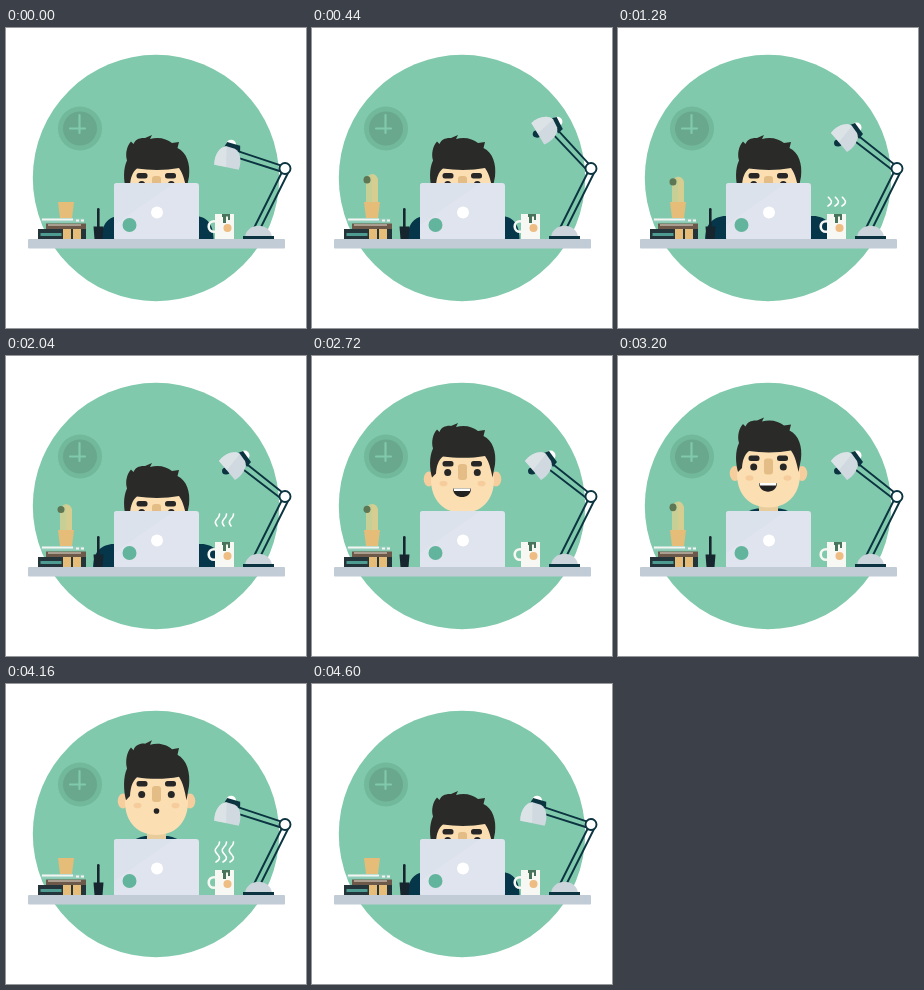
Write an HTML page that moves like this. It is 300x300 px and loops after 4.64 s.

```html
<!DOCTYPE html>
<html lang="en">
<head>
<meta charset="utf-8">
<title>Desk surprise</title>
<style>
  html, body { margin: 0; width: 100%; height: 100%; overflow: hidden; background: #fff; }
  svg { display: block; width: 100vw; height: 100vh; }
  .line { fill: none; stroke-linecap: round; stroke-linejoin: round; }
</style>
</head>
<body>
<svg viewBox="0 0 300 300">
  <clipPath id="aboveDesk"><path d="M0 0H300V212H0Z"/></clipPath>
  <circle cx="150" cy="150" r="123.2" fill="#80c9ac"/>

  <g id="clock">
    <circle cx="74" cy="100.5" r="22" fill="#72b89b"/>
    <circle cx="74" cy="100.5" r="17" fill="#69a88d"/>
    <path class="line" d="M73.5 87V105M64 100.5H79" stroke="#80c9ac" stroke-width="2.2"/>
  </g>

  <g clip-path="url(#aboveDesk)">
    <path id="arms" d="M-56 212C-56 196 -50 190 -40 188H40C50 190 56 196 56 212Z" fill="#06364a"/>
    <g id="person">
      <path d="M118 216V172Q121 156 139 152.5H162Q180 156 183 172V216Z" fill="#06364a"/>
      <path d="M141 143H160V156Q150.5 160 141 156Z" fill="#e9cc9c"/>
      <g fill="#f6cd9c">
        <ellipse cx="117" cy="117.5" rx="5.3" ry="7.5"/>
        <ellipse cx="184" cy="117.5" rx="5.3" ry="7.5"/>
      </g>
      <path d="M122 90H179L182 118C182 140 168 151.5 150.5 151.5S119 140 119 118Z" fill="#fbdfb3"/>
      <g fill="#f6cc9c">
        <ellipse cx="131.5" cy="122" rx="4" ry="2.8"/>
        <ellipse cx="169.500" cy="122" rx="4" ry="2.8"/>
      </g>
      <rect x="146" y="102.5" width="9" height="16" rx="3" fill="#e3bd85"/>
      <g fill="#272727">
        <circle cx="135.7" cy="111" r="3.5"/>
        <circle cx="165.3" cy="111" r="3.5"/>
      </g>
      <g id="smile">
        <path d="M-9 -4H9C9 7.500 -9 7.500 -9 -4Z" fill="#222"/>
        <path d="M-8.500 -4H8.500L8 -1.500H-8Z" fill="#fff"/>
      </g>
      <circle id="gasp" r="2.8" fill="#222"/>
      <path id="hair" fill="#2a2a29" d="M120 116C117.500 107 117 95 121 87C119 80 121 72 125 68L127.500 70.500
        C129 66 134 64 139 64.500L146 61.500L144 65.500C153 63 161 65.500 166 69.500L173 68.500L171.500 74.500
        C181 79 184.500 91 183 103L180.500 116C179 108 177 100 173 94.500C160 97 144 97 131 95
        C126 99 124.500 105 124 112Z"/>
      <g id="brows" fill="#272727">
        <rect x="130.500" y="99.500" width="11" height="5.500" rx="2.500"/>
        <rect x="159" y="99.500" width="11" height="5.500" rx="2.500"/>
      </g>
    </g>
  </g>

  <g id="pencils" fill="#17252e">
    <path d="M87.500 198.500H97.500L96.500 211H88.500Z"/>
    <rect x="91" y="180" width="2.600" height="20" rx="1.300"/>
  </g>

  <g id="cactus">
    <path d="M54 178V156C54 147 66 146 66 156V178Z" fill="#c8cf96"/>
    <path d="M60 149Q66 150 66 156V178H60Z" fill="#d6ce90"/>
    <circle cx="55" cy="154" r="3.500" fill="#5d7755"/>
  </g>
  <path d="M52 174H68L66 190H54Z" fill="#e5bd78"/>

  <g id="books">
    <rect x="35" y="190.500" width="43" height="4" fill="#93cdbb"/>
    <path d="M36 191.500H67M70 192.500H73M75 192.500H78" stroke="#f3f5f2" stroke-width="2"/>
    <rect x="40" y="195.500" width="40" height="5.500" fill="#6d5949"/>
    <path d="M42 197H75" stroke="#e8e3d6"/>
    <rect x="32" y="201" width="48" height="10" fill="#23343b"/>
    <rect x="34.500" y="205" width="21" height="3" fill="#4d9b91"/>
    <path d="M57 201H65V211H57ZM67 201H75V211H67Z" fill="#e5bd78"/>
  </g>

  <g id="laptop">
    <rect x="108" y="155" width="85" height="58" rx="3" fill="#e0e4ee"/>
    <path d="M111 155H168L108 197V158Q108 155 111 155Z" fill="#dbe2eb"/>
    <circle cx="151" cy="184.500" r="6" fill="#fff"/>
    <circle cx="123.500" cy="197" r="7" fill="#62b59c"/>
  </g>

  <g id="mug">
    <circle cx="208" cy="198.500" r="5.300" fill="none" stroke="#f7f7f3" stroke-width="2.600"/>
    <path d="M209 186H228V211H209Z" fill="#f7f7f3"/>
    <path d="M216 186H224V192H222V188.500H220V195H217V189H216Z" fill="#48745b"/>
    <circle cx="221.500" cy="200" r="4" fill="#edbd83"/>
  </g>
  <g id="steam" class="line" stroke="#fff" stroke-width="1.600"></g>

  <g id="lamp">
    <path class="line" d="M247 202L276 144M253.500 202L282 145" stroke="#0b3440" stroke-width="1.900"/>
    <path d="M239 209C241 194 264 194 266 209Z" fill="#cbd5db"/>
    <rect x="237" y="208" width="31" height="3" fill="#0b3440"/>
    <g id="lampArm">
      <path class="line" d="M240 107.500L279 138.500M236 112.500L275 142.500" stroke="#0b3440" stroke-width="1.900"/>
      <g id="lampHead">
        <circle cx="238.500" cy="99.500" r="5" fill="#fff"/>
        <path d="M232 97L237 95L245 106L241 111Z" fill="#0b3440"/>
        <ellipse id="bulb" cx="220" cy="115" rx="4" ry="3.500" fill="#0b3440"/>
        <path d="M213 105C219 97 229 94 234 98L239 105C242 111 236 120 229 124Z" fill="#cfd9df"/>
        <path d="M213 105C219 97 229 94 234 98L221 114Z" fill="#dce3e7"/>
      </g>
    </g>
    <circle cx="279" cy="140.500" r="5.500" fill="#fff" stroke="#0b3440" stroke-width="1.900"/>
  </g>

  <rect x="22" y="211" width="257" height="9.500" rx="1" fill="#c2ccd7"/>
</svg>
<script>
const LOOP = 4640;
const $ = id => document.getElementById(id);
const place = (id, transform) => $(id).setAttribute('transform', transform);

// Smoothly interpolates [time, value] pairs.
function track(t, keys) {
  if (t <= keys[0][0]) return keys[0][1];
  for (let i = 1; i < keys.length; i++) {
    const [t0, a] = keys[i - 1], [t1, b] = keys[i];
    if (t < t1) {
      const u = (t - t0) / (t1 - t0);
      return a + (b - a) * u * u * (3 - 2 * u);
    }
  }
  return keys[keys.length - 1][1];
}

const HEAD = [[2250, 45.5], [2780, 4], [3200, 0], [3650, 0], [3850, -2], [4160, -.5], [4440, 45.5]];
const HAIR = [[3650, 1], [3850, 1.13], [4160, 1.1], [4440, 1]];
const BROWS = [[3650, 0], [3850, -2.5], [4160, -2], [4440, 0]];
const ARMS = [[440, 1], [1280, 1.15], [2250, 1.15], [2500, .65], [4300, .65], [4480, 1]];
const LAMP = [[200, -20], [440, 9], [640, -3], [800, 0], [3650, 0], [3850, -20]];
const CACTUS = [[160, 0], [400, 1.12], [600, .95], [760, 1], [2720, 1.03], [3200, 1.12], [3650, 1.1], [3850, 0]];
const SMILE = [[3600, 1], [3780, 0]];
const STEAM_TOP = [[1100, 0], [1480, 1]];
const STEAM_TAIL = [[1880, 0], [2240, 1]];

for (const x of [210, 217, 224]) {
  $('steam').insertAdjacentHTML('beforeend',
    `<path pathLength="1" d="M${x} 178c3 -2 5 -4 2 -7s-4 -5 -1 -8s2 -3 2.500 -5"/>`);
}

function draw(now) {
  const t = now % LOOP;
  const smile = track(t, SMILE), lamp = track(t, LAMP);
  place('person', `translate(0 ${track(t, HEAD)})`);
  place('hair', `translate(0 108) scale(1 ${track(t, HAIR)}) translate(0 -108)`);
  place('brows', `translate(0 ${track(t, BROWS)})`);
  place('arms', `translate(151.5 0) scale(${track(t, ARMS)} 1)`);
  place('smile', `translate(150 131) scale(${smile})`);
  place('gasp', `translate(150.5 127.5) scale(${1 - smile})`);
  place('lampArm', `rotate(${lamp} 279 140.5)`);
  place('lampHead', `rotate(${Math.min(0, lamp) * .9} 238 106)`);
  $('bulb').setAttribute('opacity', Math.min(1, 1 + lamp / 20));
  place('cactus', `translate(0 176) scale(1 ${track(t, CACTUS)}) translate(0 -176)`);

  const s = t % (LOOP / 2), top = track(s, STEAM_TOP), tail = track(s, STEAM_TAIL);
  const steam = $('steam');
  steam.setAttribute('visibility', top > tail ? 'visible' : 'hidden');
  steam.setAttribute('stroke-dasharray', `${Math.max(0, top - tail)} 3`);
  steam.setAttribute('stroke-dashoffset', -tail);
  requestAnimationFrame(() => draw(performance.now()));
}
draw(performance.now());
</script>
</body>
</html>
```
